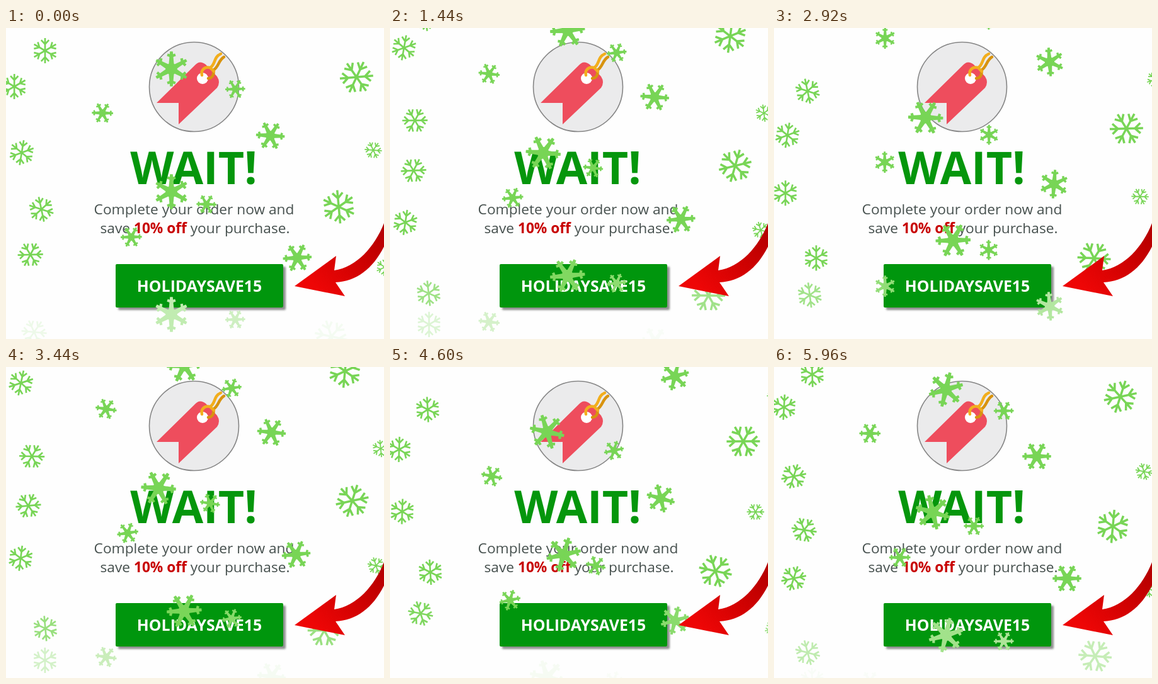
Animation of 600x494 px, one loop 6 s. Source, as an HTML page:

```html
<!DOCTYPE html>
<html lang="en">
<head>
<meta charset="utf-8">
<title>Holiday offer</title>
<style>
  html, body { margin: 0; width: 100%; height: 100%; overflow: hidden; background: #fefefe; }
  svg { display: block; width: 100vw; height: 100vh; }
  text { font-family: "Open Sans", "Noto Sans", sans-serif; text-anchor: middle; }
  .bold { font-weight: 700; }
</style>
</head>
<body>
<svg viewBox="0 0 600 494">
  <defs>
    <filter id="soft" x="-10%" y="-20%" width="125%" height="150%">
      <feDropShadow dx="4" dy="4" stdDeviation="1.4" flood-color="#555" flood-opacity=".65"/>
    </filter>
    <linearGradient id="red" gradientUnits="userSpaceOnUse" x1="600" y1="320" x2="500" y2="420">
      <stop offset="0" stop-color="#b40000"/>
      <stop offset=".55" stop-color="#d40202"/>
      <stop offset="1" stop-color="#ee0606"/>
    </linearGradient>
    <path id="thinArm" fill="none" stroke="currentColor" stroke-width="13"
      d="M0 0V-98M-30 -82L0 -50L30 -82"/>
    <g id="thickArm">
      <path fill="currentColor" d="M-17 0L-8 -99H8L17 0Z"/>
      <path fill="none" stroke="currentColor" stroke-width="15" d="M-23 -80L0 -72L23 -80"/>
    </g>
    <g id="thin"></g>
    <g id="thick"><circle r="33" fill="currentColor"/></g>
  </defs>

  <circle cx="298.5" cy="93.5" r="71" fill="#ebebec" stroke="#858585" stroke-width="1.6"/>
  <path fill="#ee4d5d" d="M239 119L299 60Q307 50 317 58L335 77Q341 86 335 95L274 153V119Z"/>
  <circle cx="312" cy="80" r="9" fill="#fff"/>
  <g fill="none" stroke-linecap="round" stroke-width="4.5">
    <path stroke="#d8930f" d="M346 46C337 51 338 62 329 67C331 74 327 80 321 80"/>
    <path stroke="#f2ae1d" d="M341 41C329 46 333 58 324 63C315 61 309 67 311 75M324 63L330 69"/>
  </g>

  <text class="bold" x="298" y="248" font-size="71.6" fill="#05960c">WAIT!</text>
  <g font-size="22.7" fill="#46504e">
    <text x="298.5" y="296">Complete your order now and</text>
    <text x="300" y="326">save <tspan class="bold" fill="#c80000">10% off</tspan> your purchase.</text>
  </g>
  <rect x="174" y="375" width="266" height="69" rx="2" fill="#05960c" filter="url(#soft)"/>
  <text class="bold" x="307" y="418.5" font-size="24.85" fill="#fff">HOLIDAYSAVE15</text>

  <g id="snow"></g>

  <path fill="url(#red)" d="M458 410L524 362L521 385C556 380 585 348 600 310L606 300V334C588 378 560 402 523 404L538 426Z"/>
</svg>
<script>
const NS = "http://www.w3.org/2000/svg";
const $ = id => document.getElementById(id);
const clamp = (v, lo, hi) => Math.min(hi, Math.max(lo, v));

function addUse(parent, id) {
  const el = document.createElementNS(NS, "use");
  el.setAttribute("href", "#" + id);
  return parent.appendChild(el);
}

for (const kind of ["thin", "thick"])
  for (let i = 0; i < 6; i++)
    addUse($(kind), kind + "Arm").setAttribute("transform", `rotate(${i * 60})`);

const LOOP = 6000, STEP = 59.4, PERIOD = 2084;
const SWAY = { thin: 2.7, thick: 2 };  // periods per full swing

// A lane drops one flake per period; it swings around x and is furthest right at age `peak`.
const lane = (kind, size, x, swing, peak, y, fall, turn = 0) =>
  ({ kind, size, x, swing, peak, y, fall, turn,
     flakes: [-2, -1, 0, 1, 2].map(age => ({ age, el: addUse($("snow"), kind) })) });

const lanes = [
  lane("thin", 20.5, 40, 22, 0, 36, 162, 30),
  lane("thin", 20.5, 40, 27, 1.4, 93, 195, 30),
  lane("thin", 27, 533, 28, 0.25, 78, 206),
  lane("thin", 14, 598, 18, 1.6, 194, 186),
  lane("thick", 17, 176, 24, 0.9, 135, 197),
  lane("thick", 28, 262.5, 23, 1.5, 65, 195),
  lane("thick", 16, 341, 24, -0.1, 97, 183),
  lane("thick", 23, 441, 24, 0.85, 171, 194)
];

function drawFlake(el, lane, age) {
  const swing = Math.cos(2 * Math.PI * (age - lane.peak) / SWAY[lane.kind]);
  const x = lane.x + lane.swing * swing;
  const y = lane.y + lane.fall * age;
  const pale = clamp((y - 385) / 130, 0, 0.8);
  const tint = [120, 213, 86].map(c => Math.round(c + (255 - c) * pale));
  el.setAttribute("transform",
    `translate(${x.toFixed(2)} ${y.toFixed(2)}) rotate(${(lane.turn + 30 * swing).toFixed(1)}) scale(${lane.size / 100})`);
  el.setAttribute("color", `rgb(${tint})`);
  el.setAttribute("opacity", clamp((508 - y) / 50, 0, 1).toFixed(3));
}

function render(ms) {
  // Pictures about 60 ms apart, shown on a 40 ms clock.
  const tick = Math.floor(ms / 40) * 40;
  const shown = Math.floor((tick + 19.9) / STEP) * STEP;
  const phase = shown / PERIOD % 1;
  for (const lane of lanes)
    for (const { age, el } of lane.flakes) drawFlake(el, lane, age + phase);
}

const start = performance.now();
function frame() {
  render((performance.now() - start) % LOOP);
  requestAnimationFrame(frame);
}
render(0);
requestAnimationFrame(frame);
</script>
</body>
</html>
```
